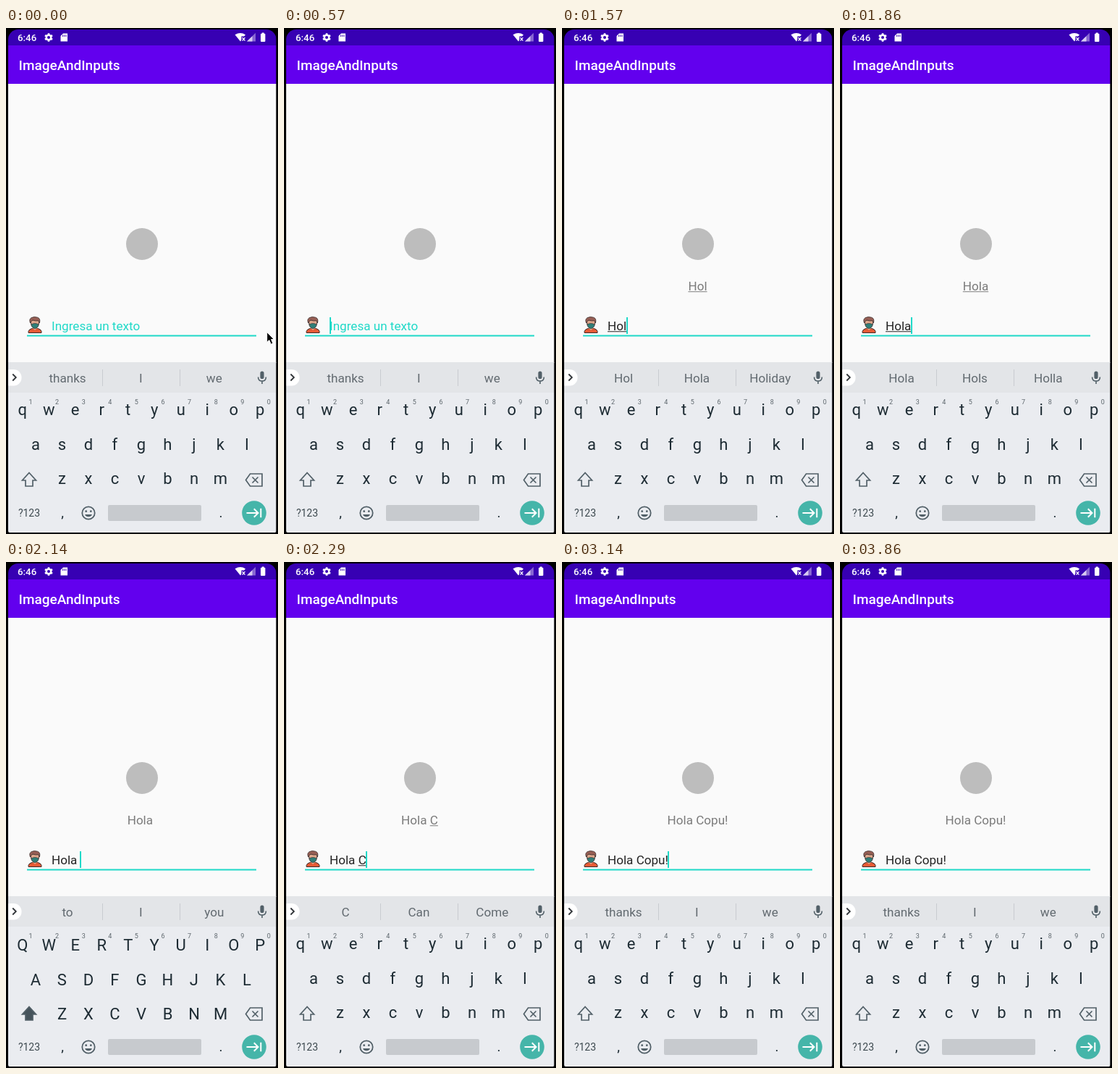
An HTML page with a canvas that plays this animation: 376x698 px, repeating every 4010 ms.

```html
<!DOCTYPE html>
<html lang="es">
<head>
<meta charset="utf-8">
<title>ImageAndInputs</title>
<style>
html, body { margin: 0; width: 100%; height: 100%; overflow: hidden; background: #000; }
canvas { display: block; width: 376px; height: 698px; }
</style>
</head>
<body>
<canvas id="stage" width="376" height="698"></canvas>
<script>
const ctx = document.getElementById('stage').getContext('2d');
const LOOP = 4010;
const LEFT = 3, WIDTH = 370.6;
const TEAL = '#1fd9c8', ICON = '#526068', KEY = '#1d2b33';
const BODY = 17.1;

// start time, typed text, index where the underlined word begins, suggestions
const STEPS = [
  [0, '', 0, 'thanks I we'],
  [1140, 'H', 0, 'H Hi How'],
  [1430, 'Ho', 0, 'Ho Hot How'],
  [1570, 'Hol', 0, 'Hol Hola Holiday'],
  [1710, 'Hola', 0, 'Hola Hols Holla'],
  [2000, 'Hola ', 5, 'to I you'],
  [2290, 'Hola C', 5, 'C Can Come'],
  [2430, 'Hola Co', 5, 'Co Come Connect'],
  [2570, 'Hola Cop', 5, 'Cop Compass Coop'],
  [2710, 'Hola Copu', 5, 'Copu Copy Copying'],
  [3000, 'Hola Copu!', 10, 'thanks I we']
];

function font(size, weight = 400) {
  ctx.font = `${weight} ${size}px Roboto, "Noto Sans", sans-serif`;
}

function text(str, x, y, size, color, align = 'left', weight = 400) {
  font(size, weight);
  ctx.textAlign = align;
  ctx.fillStyle = color;
  ctx.fillText(str, x, y);
}

function rect(x, y, w, h, color, radius = 0) {
  ctx.fillStyle = color;
  ctx.beginPath();
  ctx.roundRect(x, y, w, h, radius);
  ctx.fill();
}

function band(y, h, color) {
  rect(LEFT, y, WIDTH, h, color);
}

function circle(x, y, r, color) {
  ctx.fillStyle = color;
  ctx.beginPath();
  ctx.arc(x, y, r, 0, Math.PI * 2);
  ctx.fill();
}

function shape(d, fill, stroke, width = 1) {
  const path = new Path2D(d);
  if (fill) {
    ctx.fillStyle = fill;
    ctx.fill(path);
  }
  if (stroke) {
    ctx.strokeStyle = stroke;
    ctx.lineWidth = width;
    ctx.stroke(path);
  }
}

function typed(str, from, x, y, color) {
  text(str, x, y, BODY, color);
  const start = ctx.measureText(str.slice(0, from)).width;
  const end = ctx.measureText(str).width;
  if (from < str.length) rect(x + start, y + 1.5, end - start, 1, color);
  return x + end;
}

function gear(x, y) {
  ctx.strokeStyle = '#fff';
  ctx.lineWidth = 2.6;
  for (let i = 0; i < 3; i++) {
    const angle = Math.PI / 6 + i * Math.PI / 3;
    const dx = Math.cos(angle) * 5.8, dy = Math.sin(angle) * 5.8;
    ctx.beginPath();
    ctx.moveTo(x - dx, y - dy);
    ctx.lineTo(x + dx, y + dy);
    ctx.stroke();
  }
  circle(x, y, 4.5, '#fff');
  circle(x, y, 2, '#3700b3');
}

function statusBar() {
  band(2, 22, '#3700b3');
  text('6:46', 16, 17.6, 13.3, '#fff', 'left', 500);
  gear(59, 13);
  shape('M79 7.5H85V18.5H75.5V11Z', '#fff');
  shape('M78.6 9.5V12M80.8 9.5V12M83 9.5V12', null, '#3700b3', 1);
  shape('M316.5 9.3Q324 4.5 331 9.3L324 18.4Z', '#fff');
  rect(325.4, 11.4, 6, 8, '#3700b3');
  shape('M326.6 13.2L330.4 17.6M330.4 13.2L326.6 17.6', null, '#fff', 1.3);
  shape('M333 18.5H345V6.8Z', 'rgba(255,255,255,.4)');
  shape('M333 18.5H340.5V11.2Z', '#d9ccf2');
  rect(352, 7.8, 6.4, 11.2, '#fff', 1);
  rect(353.7, 6.6, 3, 2, '#fff');
}

function avatar() {
  const line = '#3d302f';
  shape('M31 420.5V418.5Q31.5 415.5 36.5 414.3H43.5Q48.5 415.5 49 418.5V420.5Z', '#e65a35', line, 1);
  shape('M37.5 411H42.5V414.5L40 417L37.5 414.5Z', '#dfa78c');
  shape('M34.5 403H45.5V408Q44.5 413.5 40 414Q35.5 413.5 34.5 408Z', '#dfa78c', line, .8);
  shape('M35 408.5Q40 406.3 45 408.5L44.5 411.5Q42.5 414.5 40 414.5Q37.5 414.5 35.5 411.5Z', '#2f7f78', line, .6);
  shape('M33.5 407Q31.5 401.5 35 399.7Q39 397.6 43.5 399.2Q48 400.4 46.4 407L45 403.8Q40 404.5 37.3 403Q35.5 403.2 34.8 405Z',
    '#975f55', line, .8);
}

function content(str, from, caret) {
  band(77, 385, '#fafafa');
  band(24, 53, '#6200ee');
  text('ImageAndInputs', 17.6, 57.6, 19, '#fff', 'left', 500);

  circle(188, 298, 22, '#bdbdbd');
  avatar();

  font(BODY);
  typed(str, from, 187.5 - ctx.measureText(str).width / 2, 361.7, '#7b7b7b');
  if (!str) text('Ingresa un texto', 63, 416.8, BODY, TEAL);
  const end = typed(str, from, 63, 416.8, '#242424');
  if (caret) rect(Math.round(end - .5), 399, 2, 23, TEAL);
  rect(29, 423.4, 317, 2, TEAL);
}

function suggestions(words) {
  band(461, 42, '#e3e5e8');
  rect(-6, 471, 27.5, 22.5, '#fff', 11);
  shape('M9.2 477.5L13.8 482L9.2 486.5', null, '#303438', 1.8);
  words.split(' ').forEach((word, i) => text(word, 85 + i * 101.4, 488.8, BODY, '#626a70', 'center'));
  rect(133, 471, 1, 23, '#c9ccd0');
  rect(240, 471, 1, 23, '#c9ccd0');
  rect(351.4, 473.5, 5.2, 10.5, ICON, 2.6);
  shape('M348.6 481.5Q348.6 487 354 487T359.4 481.5M354 487V491', null, ICON, 1.6);
}

function row(letters, x, y, caps) {
  [...letters].forEach((ch, i) =>
    text(caps ? ch.toUpperCase() : ch, x + i * 36.5, y + (caps ? 2 : 0), 22, KEY, 'center'));
}

function smiley(x, y) {
  ctx.strokeStyle = ICON;
  ctx.lineWidth = 1.8;
  ctx.beginPath();
  ctx.arc(x, y, 8.7, 0, Math.PI * 2);
  ctx.stroke();
  circle(x - 3.3, y - 2.3, 1.4, ICON);
  circle(x + 3.3, y - 2.3, 1.4, ICON);
  ctx.beginPath();
  ctx.ellipse(x, y + 1.9, 4.8, 3.4, 0, 0, Math.PI);
  ctx.fill();
}

function keyboard(caps) {
  band(503, 193, '#eaecf0');
  row('qwertyuiop', 22.7, 534, caps);
  row('asdfghjkl', 40.9, 581.6, caps);
  row('zxcvbnm', 77.5, 629.3, caps);
  [...'1234567890'].forEach((n, i) => text(n, 34 + i * 36.6, 519.3, 9, '#5d666c', 'center'));

  shape('M32 613.5L41.5 624H37V632H27V624H22.5Z', caps ? '#45535b' : null, ICON, 1.7);
  shape('M337.5 615H354V632H337.5L331.5 623.5Z', null, ICON, 1.7);
  shape('M340.5 619.5L348.5 627.5M348.5 619.5L340.5 627.5', null, ICON, 1.7);

  text('?123', 32, 674, 14, '#3d494f', 'center');
  text(',', 78, 675, 19, KEY, 'center');
  text('.', 297, 675, 19, KEY, 'center');
  smiley(114, 669);

  rect(141, 658, 129, 22, '#c7cace', 2);
  circle(343, 669, 16.8, '#45b5a9');
  shape('M332.5 669H348M342.8 663.3L348.5 669L342.8 674.7M352.3 662.7V675.3', null, '#fff', 2);
}

function pointer() {
  shape('M360.7 419.5V433.5L363.9 430.6L366.3 436.3L369 435.1L366.6 429.6H370.6Z', '#000', '#fff', 1);
}

function draw(t) {
  const [, str, from, words] = STEPS.findLast(step => step[0] <= t);
  ctx.fillStyle = '#000';
  ctx.fillRect(0, 0, 376, 698);
  ctx.save();
  ctx.beginPath();
  ctx.roundRect(LEFT, 2, WIDTH, 694, [14, 14, 2, 2]);
  ctx.clip();
  statusBar();
  content(str, from, t >= 570 && t < 3570);
  suggestions(words);
  keyboard(t >= 2140 && t < 2290);
  if (t < 140) pointer();
  ctx.restore();
}

const began = performance.now();
function tick() {
  draw((performance.now() - began) % LOOP);
  requestAnimationFrame(tick);
}
tick();
</script>
</body>
</html>
```
